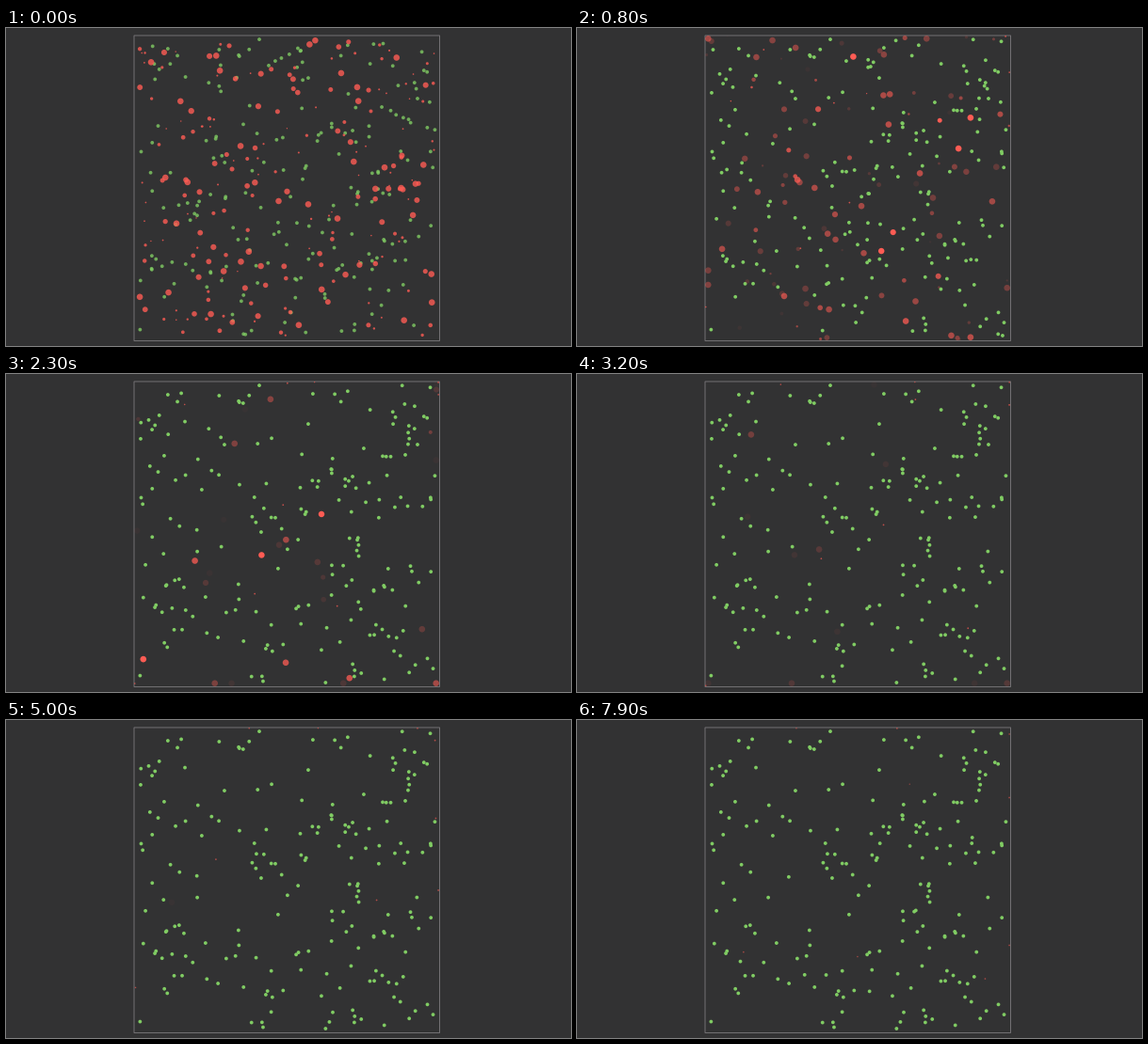
A matplotlib script for the animation above (8000 ms loop, 600x338 px).

```python
import numpy as np
import matplotlib.pyplot as plt
from matplotlib.animation import FuncAnimation
from matplotlib.patches import Rectangle

W, H, DPI = 600, 338, 100
FRAMES, STEP = 80, 100
BOX = np.array([[136, 8], [460, 332]], float)
BACK, LINE = "#323233", "#727073"
GREEN, RED = (0.50, 0.80, 0.39), (1.0, 0.36, 0.33)
FOOD, FOOD_R = 198, 1.9
BRIEF, HARDY, LASTING, TINY = 145, 58, 4, 9

rng = np.random.default_rng(12)


def scatter_in_box(n, margin=4):
    return rng.uniform(BOX[0] + margin, BOX[1] - margin, (n, 2))


def make_hunters():
    """Radius and lifetime (in steps) of every hunter."""
    r = np.concatenate([
        0.7 + 2.5 * rng.random(BRIEF) ** 1.3,
        3.3 - 2.2 * rng.random(HARDY) ** 4,
        np.full(LASTING, 3.3),
        rng.uniform(0.65, 0.9, TINY)])
    life = np.concatenate([
        rng.uniform(1.5, 8.5, BRIEF),
        rng.uniform(8, 27, HARDY),
        rng.uniform(36, 41, LASTING),
        np.full(TINY, 190)])
    return r, life


def simulate():
    """Hunters roam, fade as they starve and flare up when they eat;
    eaten food grows again elsewhere."""
    r, life = make_hunters()
    n = len(r)
    pos, food = scatter_in_box(n), scatter_in_box(FOOD)
    heading = rng.uniform(0, 2 * np.pi, n)
    speed = rng.uniform(3, 8, n)
    glow = np.zeros(n)
    pad = r[:, None]
    steps = []
    for t in range(FRAMES):
        fade = 0.8 * np.clip(1 - t / life, 0, 1) ** 0.8
        alpha = np.maximum(fade, glow)
        seen = alpha > 0.03
        steps.append((food.copy(), pos[seen], r[seen], alpha[seen]))

        heading += rng.normal(0, 0.3, n)
        way = np.c_[np.cos(heading), np.sin(heading)]
        pos = np.clip(pos + speed[:, None] * way, BOX[0] + pad, BOX[1] - pad)

        gap = np.linalg.norm(food[:, None] - pos, axis=2)
        touch = (gap < r + FOOD_R) & (fade > 0)
        eaten = touch.any(axis=1)
        food[eaten] = scatter_in_box(eaten.sum())
        glow = np.where(touch.any(axis=0) & (r > 1), 1.0, glow * 0.75)
    return steps


def area(r):
    return (2 * r * 72 / DPI) ** 2


def place(dots, xy, r, rgb, alpha):
    dots.set_offsets(xy)
    dots.set_sizes(area(r))
    dots.set_facecolors(np.c_[np.tile(rgb, (len(xy), 1)), alpha])


steps = simulate()

fig = plt.figure(figsize=(W / DPI, H / DPI), dpi=DPI, facecolor=BACK)
ax = fig.add_axes([0, 0, 1, 1])
ax.set_xlim(0, W)
ax.set_ylim(H, 0)
ax.axis("off")
ax.add_patch(Rectangle(BOX[0], *(BOX[1] - BOX[0] + 0.5), fill=False,
                       ec=LINE, lw=0.72, snap=False))
greens = ax.scatter([], [], linewidths=0, zorder=3)
reds = ax.scatter([], [], linewidths=0, zorder=4)


def draw(t):
    food, pos, r, alpha = steps[t]
    shade = np.full(len(food), 0.8 if t == 0 else 1.0)
    place(greens, food, np.full(len(food), FOOD_R), GREEN, shade)
    place(reds, pos, r, RED, alpha)
    return greens, reds


anim = FuncAnimation(fig, draw, frames=FRAMES, interval=STEP,
                     repeat=True, repeat_delay=0)
plt.show()
```
